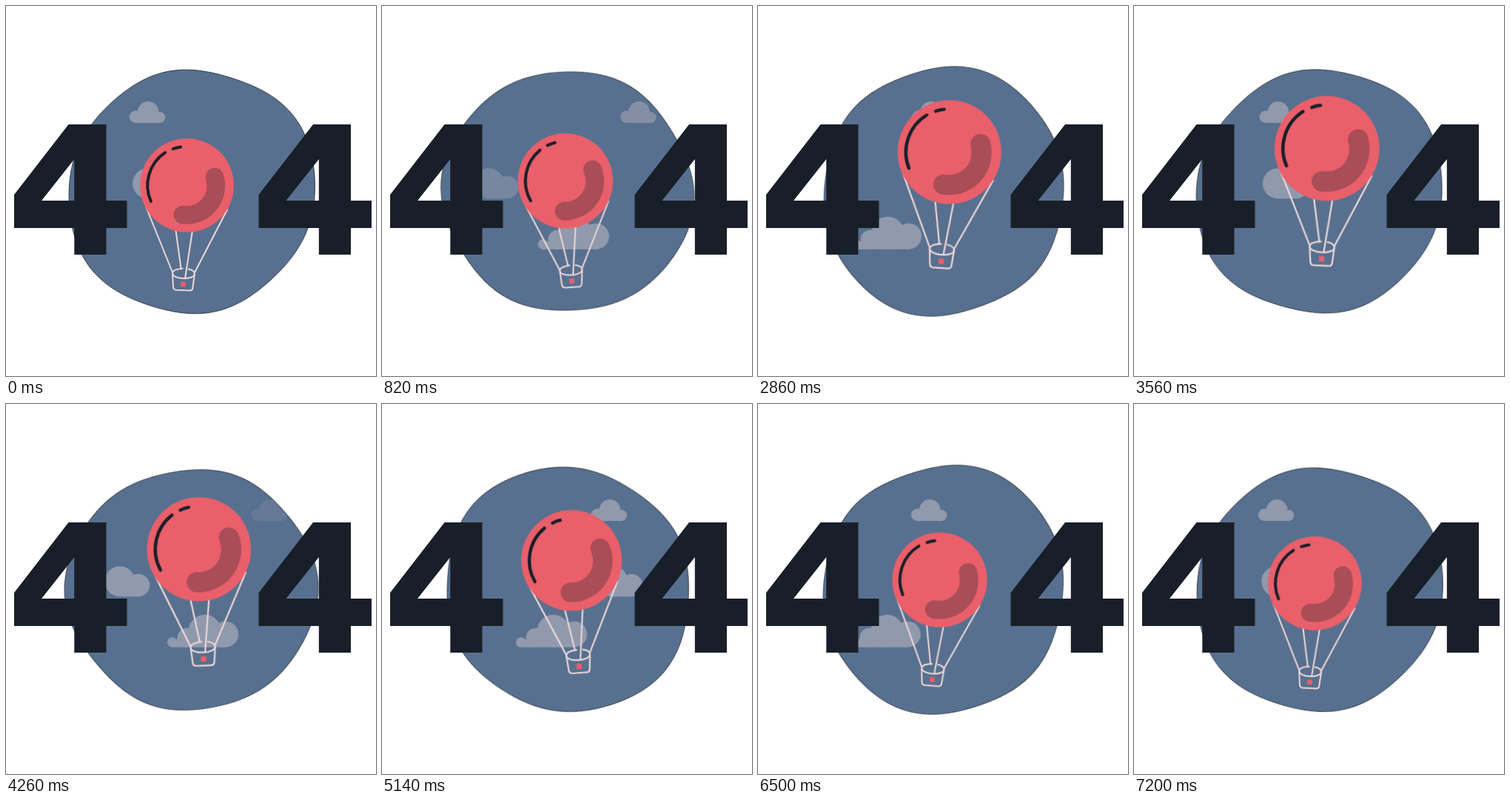
Animation, 500 px wide and 500 px high, one loop 7.22 s. Source, as an HTML page:

```html
<!DOCTYPE html>
<html lang="en">
<head>
<meta charset="utf-8">
<title>404</title>
<style>
  html, body { margin: 0; width: 100%; height: 100%; overflow: hidden; background: #fff; }
  svg { display: block; width: 100%; height: 100%; }

  #blob {
    fill: #58708f; stroke: #181f29; stroke-width: .8;
    transform-origin: 250.7px 250.7px;
    animation: turn 7220ms linear infinite;
  }
  @keyframes turn { to { transform: rotate(360deg); } }

  .cloud { fill: #e8d8da; animation: drift 3610ms linear infinite; }
  @keyframes drift {
    0% { transform: translateX(0); opacity: 0; }
    9%, 87% { opacity: .4; }
    96% { opacity: 0; }
    100% { transform: translateX(var(--shift)); opacity: 0; }
  }

  #balloon {
    transform-origin: 245px 230px;
    animation: rise 3610ms cubic-bezier(.37, 0, .63, 1) infinite alternate;
  }
  @keyframes rise {
    to { transform: translate(16.5px, -51.4px) scale(1.118); }
  }

  .line { fill: none; stroke-linecap: round; stroke-linejoin: round; }
  .rope { stroke: #ead6d8; stroke-width: 2; }
  .shine { stroke: #181f29; stroke-width: 4; }
  .shade { stroke: #a94d57; stroke-width: 24.5; }
</style>
</head>
<body>
<svg viewBox="0 0 500 500" role="img" aria-label="404">
  <path id="blob"/>

  <!-- small, middle and large cloud -->
  <g class="cloud" style="--shift: -201px; animation-delay: -3040ms">
    <circle cx="344.3" cy="149.8" r="8.2"/>
    <circle cx="361.3" cy="143.3" r="14.3"/>
    <circle cx="377" cy="150.5" r="7.5"/>
    <path d="M344.3 145H377V158H344.3Z"/>
  </g>
  <g class="cloud" style="--shift: -209px; animation-delay: -2460ms">
    <circle cx="334" cy="239.7" r="20.5"/>
    <circle cx="359" cy="245" r="15.3"/>
    <path d="M334 240H359V260.3H334Z"/>
  </g>
  <g class="cloud" style="--shift: -152px">
    <circle cx="252" cy="322" r="6.7"/>
    <circle cx="272" cy="315.7" r="13"/>
    <circle cx="296" cy="306.7" r="22"/>
    <circle cx="324" cy="311.2" r="17.5"/>
    <path d="M252 318H324V328.7H252Z"/>
  </g>

  <g id="balloon">
    <g id="swing">
      <g class="line rope">
        <path d="M189 271L225 360M299 275L254.500 361M229 300L236.500 355M252.500 300L242 368"/>
        <path d="M246.500 355.500C251 356.500 255 359 254.800 362.200C254.500 366 247.500 368.500 239.500 368.100
                 C231 367.800 224.800 364.600 225 361C225.200 357.200 231 355 238.500 355"/>
        <path d="M225 362L226 380Q226.300 383.500 230 383.800L248 384.500Q251.800 384.600 252.300 381L254.700 363"/>
      </g>
      <rect x="236.300" y="372.800" width="6.500" height="6.500" fill="#e95f6a"/>
      <circle cx="244.500" cy="242.400" r="63.400" fill="#e95f6a"/>
      <path class="line shade" d="M282 231A39.700 39.700 0 0 1 238.700 282.200"/>
      <path class="line shine" d="M195.800 264A53.200 53.200 0 0 1 215 198.200M225.700 193Q231 191 236 190.400"/>
    </g>
  </g>

  <g fill="#181f29">
    <path id="four" fill-rule="evenodd"
      d="M84.500 160H135.500V263H163.500V300H135.500V336H92.300V300H11V255ZM92.300 207V263H48Z"/>
    <use href="#four" x="330.500"/>
  </g>
</svg>
<script>
  const LOOP = 7220, SWING = 3660, TAU = 2 * Math.PI;

  // Blob outline: a circle with a few waves around it
  const wave = (amp, count, phase, a) => amp * Math.cos(count * a - phase * Math.PI / 180);
  const radius = a => 165.5 + wave(3.6, 2, -65, a) + wave(.6, 3, -30, a)
    + wave(1.6, 4, -95, a) + wave(1.5, 6, 122, a);

  const outline = Array.from({ length: 180 }, (_, i) => {
    const a = i / 180 * TAU, r = radius(a);
    return [250.7 + r * Math.cos(a), 250.7 + r * Math.sin(a)];
  });
  document.getElementById('blob').setAttribute('d', 'M' + outline.join('L') + 'Z');

  // The swing period does not divide the loop, so it jumps at the seam
  const swing = document.getElementById('swing');
  const tilt = t => 4.6 * Math.cos((t + 630) / SWING * TAU);
  const start = performance.now();

  function draw(now) {
    const t = Math.max(0, now - start) % LOOP;
    swing.setAttribute('transform', `rotate(${tilt(t) - tilt(0)} 245 230)`);
    requestAnimationFrame(draw);
  }
  draw(start);
</script>
</body>
</html>
```
